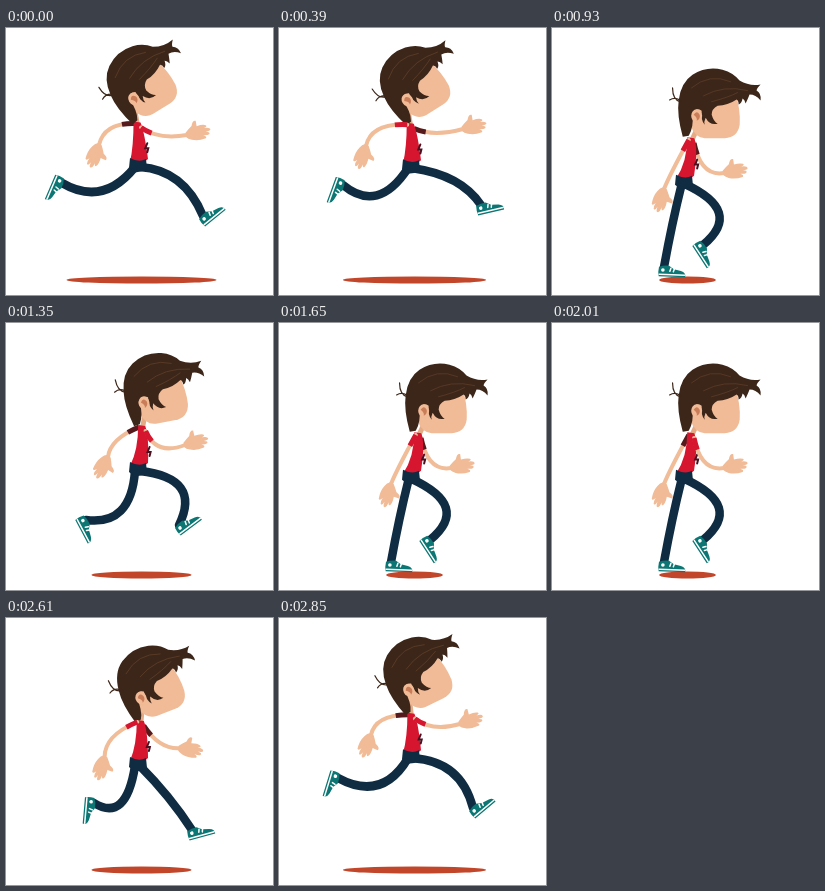
Recreate the animation shown at these times as an HTML page. Size 267x267 px, loop 2.88 s.

```html
<!DOCTYPE html>
<html lang="en">
<head>
<meta charset="utf-8">
<title>Running boy</title>
<style>
  html, body { margin: 0; width: 100%; height: 100%; overflow: hidden; background: #fff; }
  svg { display: block; width: 100%; height: 100%; }
  .leg { fill: none; stroke: #0f2c43; stroke-width: 8.5; stroke-linecap: round; }
  .arm { fill: none; stroke: #f1bc98; stroke-width: 4; stroke-linecap: round; }
  .sleeve { fill: none; stroke-width: 5; stroke-dasharray: 12 300; }
  .skin { fill: #f0bb96; }
  .hair { fill: #3c2619; }
  .line { fill: none; stroke-linecap: round; }
</style>
</head>
<body>
<svg viewBox="0 0 267 267">
  <defs>
    <g id="shoe">
      <path fill="#0b7673" d="M-5 0 Q-6 5 -5 9.500H21.500Q22.500 5 17 3.500L10 2 5-1.500Q0-2-5 0Z"/>
      <path class="line" stroke="#fff" stroke-width="1.500" d="M-4.500 7.500H21M7 1l-1 3M10.500 1.500l-1 3"/>
      <circle cx="-1" cy="3" r="1.800" fill="#fff"/>
    </g>
    <path id="hand" class="skin" d="M-1-2.500Q3-6 6-8Q8-14 11-12.500Q11-9 11-7Q17-8 20-6.500Q22-5 18-4Q24-4 24-1.500Q24 0 19 0Q24 1 22 3Q20 4 16 3Q20 5 18 6.500Q10 8 4 5.500Q0 4-1 2Z"/>
  </defs>
  <ellipse id="shadow" cx="135.500" cy="252" ry="3.600" fill="#c2462a"/>
  <g id="farArm"></g>
  <g id="farLeg"></g>
  <g id="nearLeg"></g>
  <path id="neck" class="line" stroke="#e5ab86" stroke-width="5"/>
  <path id="shirt" fill="#d6152f"/>
  <path id="print" class="line" stroke="#4a1220" stroke-width="2" d="M1-4L-1 1H2L1 5"/>
  <path id="belt" fill="#0f2c43" d="M-7-8Q2-3 9-7L10 3Q4 7-3 6L-8 2Z"/>
  <g id="head">
    <path class="skin" d="M140 72L184 66Q189 82 188 97Q186 110 173 110.500H153Q143 110 139 98Z"/>
    <path class="hair" d="M131 109Q125 87 127 73Q129 55 141 47Q155 38 171 42Q182 45 188 53Q198 59 209 57Q205 61 205 63Q210 66 209 73Q204 67 198 67Q196 72 194 76Q193 72 191 71Q190 76 187 77Q187 73 185 72Q176 78 166 78Q160 81 160 87Q162 94 166 96Q158 98 154 90Q152 94 153 97Q149 93 150 83Q144 79 141 86Q142 100 137 108Z"/>
    <path class="line" stroke="#3c2619" stroke-width="1.200" d="M129 74Q121 72 121 60M128 72Q123 69 118 72"/>
    <path class="line" stroke="#5c3d27" stroke-width=".8" d="M140 60Q158 45 179 54M152 68Q172 57 196 63M160 74Q176 70 186 65"/>
    <ellipse cx="145" cy="88" rx="5.500" ry="6.500" class="skin"/>
    <path fill="#c97d59" d="M142 87Q145 82 148 87Q149 91 145 93Q146 90 142 87Z"/>
  </g>
  <g id="nearArm"></g>
</svg>
<script>
const STEP = 30, STRIDE = 720, HALF = STRIDE / 2;
const $ = id => document.getElementById(id);

// Rows: time, end x, end y, end angle, bend x, bend y
const ARM = [
  [0, 181, 107, -10, 152, 112], [30, 184, 101, -10, 155, 109],
  [120, 165, 146, 25, 150, 142], [150, 146, 157, 60, 138, 145],
  [210, 112, 161, 110, 118, 146], [270, 102, 134, 122, 104, 116],
  [330, 92, 117, 115, 96, 97], [360, 93, 117, 115, 98, 95],
  [390, 87, 118, 112, 92, 95], [480, 108, 150, 105, 105, 130],
  [510, 130, 157, 75, 125, 143], [570, 172, 145, -8, 149, 149],
  [630, 179, 122, -12, 150, 133], [690, 181, 106, -15, 153, 114]
];
const LEG = [
  [0, 56, 155, 113, 97, 179], [30, 64, 157, 110, 99, 186],
  [90, 88, 185, 95, 120, 205], [150, 120, 208, 78, 163, 200],
  [210, 151, 217, 57, 192, 183], [270, 173, 202, -37, 196, 155],
  [330, 194, 190, -40, 182, 143], [360, 197, 188, -39, 178, 142],
  [390, 202, 177, -13, 182, 147], [420, 203, 187, -14, 176, 158],
  [450, 186, 212, -15, 164, 178], [480, 168, 230, -8, 152, 190],
  [510, 152, 238, 0, 145, 196], [570, 112, 239, 2, 120, 195],
  [630, 80, 197, 62, 125, 203], [690, 59, 160, 107, 103, 184]
];

// Periodic cubic interpolation through the rows
function sample(keys, time) {
  const t = time % STRIDE, n = keys.length;
  let i = n - 1;
  while (keys[i][0] > t) i--;
  const row = k => keys[(k + n) % n];
  const at = k => row(k)[0] + Math.floor(k / n) * STRIDE;
  const span = at(i + 1) - at(i), u = (t - at(i)) / span;
  return [1, 2, 3, 4, 5].map(c => {
    const slope = k => (row(k + 1)[c] - row(k - 1)[c]) / (at(k + 1) - at(k - 1)) * span;
    const a = row(i)[c], b = row(i + 1)[c], v = 1 - u;
    return a * (1 + 2 * u) * v * v + slope(i) * u * v * v
         + b * u * u * (3 - 2 * u) - slope(i + 1) * u * u * v;
  });
}

function makeLimb(id, end, kind, sleeve) {
  $(id).innerHTML = `<path class="${kind}"/>`
    + (sleeve ? `<path class="sleeve" stroke="${sleeve}"/>` : '')
    + `<use href="#${end}"/>`;
  const paths = $(id).querySelectorAll('path'), use = $(id).querySelector('use');
  return (root, [x, y, angle, bx, by]) => {
    paths.forEach(p => p.setAttribute('d', `M${root}Q${bx} ${by} ${x} ${y}`));
    use.setAttribute('transform', `translate(${x} ${y}) rotate(${angle})`);
  };
}

const farArm = makeLimb('farArm', 'hand', 'arm', '#561a1c');
const nearArm = makeLimb('nearArm', 'hand', 'arm', '#d6152f');
const farLeg = makeLimb('farLeg', 'shoe', 'leg');
const nearLeg = makeLimb('nearLeg', 'shoe', 'leg');

function draw(t) {
  const wave = (mean, size, lag = 0) => mean - size * Math.cos((t - lag) / HALF * 2 * Math.PI);
  const place = (id, x, y, angle = 0) =>
    $(id).setAttribute('transform', `translate(${x} ${y}) rotate(${angle})`);

  const hipY = wave(147, 9), neckX = wave(135.5, 4, 10), neckY = wave(103, 8.5);
  const earX = wave(136.5, 8.7, 10), earY = wave(80, 9), tilt = wave(-16, 16, 20);

  $('shadow').setAttribute('rx', wave(50, -25));
  $('neck').setAttribute('d', `M${neckX} ${neckY + 3}L${earX + 1} ${earY + 12}`);
  $('shirt').setAttribute('d', `M${neckX - 4} ${neckY - 1}L${neckX + 3} ${neckY}
    Q${neckX + 7} ${neckY + 10} 142 ${hipY - 7}Q134 ${hipY} 124 ${hipY - 4}
    Q${neckX - 4} ${neckY + 24} ${neckX - 4} ${neckY - 1}Z`);
  place('print', (neckX + 145) / 2 + 2, (neckY + hipY) / 2 + 3);
  place('belt', 131, hipY);
  $('head').setAttribute('transform',
    `translate(${earX} ${earY}) rotate(${tilt}) translate(-145 -88)`);

  const near = sample(ARM, t), far = sample(ARM, t + HALF);
  const shoulder = hand => {
    const reach = Math.max(-1, Math.min(1, (hand[0] - 140) / 40));
    return `${neckX + reach * 3.5} ${neckY + 3 + reach * 2}`;
  };
  nearArm(shoulder(near), near);
  farArm(shoulder(far), far);

  const hip = foot => `${131 + Math.max(-2, Math.min(3, (foot[0] - 130) / 15))} ${hipY + 1}`;
  const nearFoot = sample(LEG, t), farFoot = sample(LEG, t + HALF);
  nearLeg(hip(nearFoot), nearFoot);
  farLeg(hip(farFoot), farFoot);
}

const start = performance.now();
function tick() {
  const elapsed = performance.now() - start;
  draw(Math.floor(elapsed / STEP) * STEP % STRIDE);
  requestAnimationFrame(tick);
}
tick();
</script>
</body>
</html>
```
